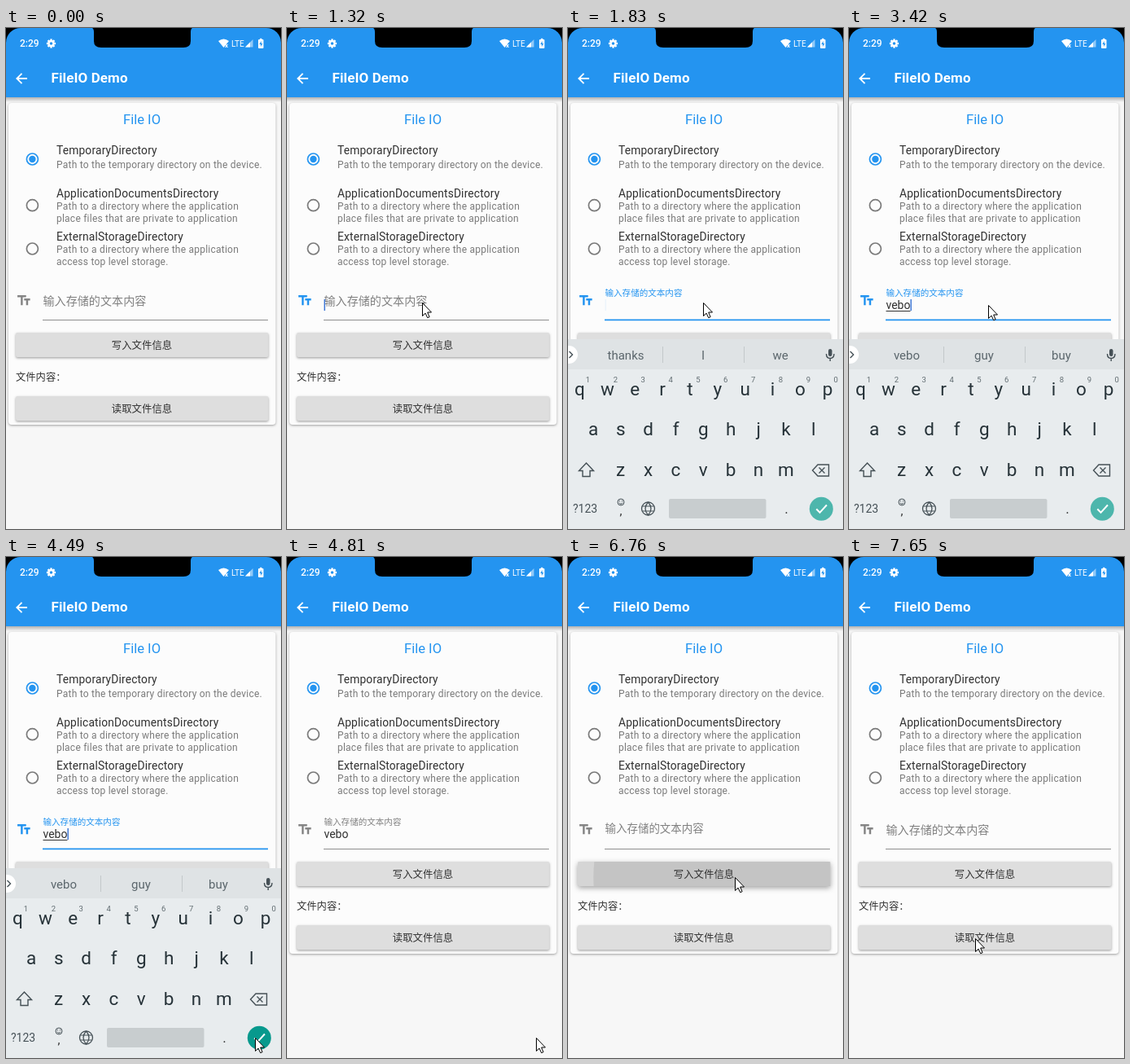
An HTML page with a canvas that plays this animation: 338 by 615 pixels, repeating every 8 s.

```html
<!DOCTYPE html>
<html lang="zh">
<head>
<meta charset="utf-8">
<style>
html, body { margin: 0; width: 100%; height: 100%; overflow: hidden; background: #f7f7f7; }
canvas { display: block; width: 338px; height: 615px; }
</style>
</head>
<body>
<canvas id="stage"></canvas>
<script>
const W = 338, H = 615, LOOP = 8000;
const BLUE = '#2494f0', GREY = '#7a7a7a', INK = '#303030';
const FONT = 'Roboto, "Noto Sans CJK SC", "Noto Sans CJK", sans-serif';
const WORD = 'vebo';

const canvas = document.getElementById('stage');
const c = canvas.getContext('2d');
const dpr = window.devicePixelRatio || 1;
canvas.width = W * dpr;
canvas.height = H * dpr;

const clamp = v => Math.max(0, Math.min(1, v));
const smooth = p => p * p * (3 - 2 * p);
const easeIn = p => p * p;
const easeOut = p => 1 - (1 - p) * (1 - p);
const phase = (t, from, to) => clamp((t - from) / (to - from));
const within = (t, from, to) => t >= from && t < to;

function text(str, x, y, size, color, { weight = 400, align = 'left', spacing = 0 } = {}) {
  c.font = `${weight} ${size}px ${FONT}`;
  c.letterSpacing = spacing + 'px';
  c.textAlign = align;
  c.fillStyle = color;
  c.fillText(str, x, y);
}
function rect(x, y, w, h, color, r = 0) {
  c.fillStyle = color;
  c.beginPath();
  c.roundRect(x, y, w, h, r);
  c.fill();
}
function raised(x, y, w, h, color, r, blur, dy) {
  c.save();
  c.shadowColor = 'rgba(0,0,0,.36)';
  c.shadowBlur = blur * dpr;
  c.shadowOffsetY = dy * dpr;
  rect(x, y, w, h, color, r);
  c.restore();
}
function disc(x, y, r, color) {
  c.fillStyle = color;
  c.beginPath();
  c.arc(x, y, r, 0, 7);
  c.fill();
}
function ring(x, y, r, color, width) {
  c.strokeStyle = color;
  c.lineWidth = width;
  c.beginPath();
  c.arc(x, y, r, 0, 7);
  c.stroke();
}
function line(d, color, width = 1.4) {
  c.strokeStyle = color;
  c.lineWidth = width;
  c.stroke(new Path2D(d));
}
function shape(d, color) {
  c.fillStyle = color;
  c.fill(new Path2D(d));
}

// Pointer moves: start, end, from, control, to, easing
const MOVES = [
  [110, 620, [273, 387], [195, 257], [166, 337], smooth],
  [3370, 4120, [166, 337], [338, 450], [306, 590], smooth],
  [5200, 6020, [306, 590], [298, 483], [237, 406], easeIn],
  [6020, 6250, [237, 406], [218, 395], [205, 393], easeOut],
  [7200, 7650, [205, 393], [180, 425], [155, 468], smooth]
];
const CLICKS = [[800, 990], [4300, 4490], [6430, 6580]];

function pointerAt(t) {
  const [from, to, a, b, d, ease] = MOVES.filter(m => t >= m[0]).pop();
  const s = ease(phase(t, from, to)), q = 1 - s;
  return [0, 1].map(i => q * q * a[i] + 2 * q * s * b[i] + s * s * d[i]);
}

function drawPointer(t) {
  if (t < 110) return;
  const [x, y] = pointerAt(t).map(Math.round);
  if (CLICKS.some(k => within(t, ...k))) ring(x, y, 14, '#333', 1);
  c.save();
  c.translate(x + .5, y + .5);
  const arrow = 'M0 0V16L3.6 12.6L6.2 18.2L8.6 17.2L6.2 11.5H11Z';
  shape(arrow, '#fff');
  line(arrow, '#000', 1);
  c.restore();
}

function drawHeader() {
  const shade = c.createLinearGradient(0, 85, 0, 91);
  shade.addColorStop(0, 'rgba(0,0,0,.28)');
  shade.addColorStop(1, 'rgba(0,0,0,0)');
  rect(0, 85, W, 6, shade);
  rect(0, 0, W, 40, '#000');
  rect(0, 0, W, 85, BLUE, [18, 18, 0, 0]);
  shape('M106 0Q108 1 108 5V16Q108 24 117 24H218Q227 24 227 16V5Q227 1 229 0Z', '#000');

  text('2:29', 17, 23, 12, '#fff', { weight: 500 });
  for (let i = 0; i < 8; i++) {
    c.save();
    c.translate(55.5, 19);
    c.rotate(i * Math.PI / 4);
    rect(-1.2, -5.6, 2.4, 3, '#fff');
    c.restore();
  }
  ring(55.5, 19, 3, '#fff', 2.4);
  shape('M261 16Q267.5 11 274 16L267.5 24Z', '#fff');
  text('x', 269, 24, 8, '#fff', { weight: 700 });
  text('LTE', 277, 22.5, 10, '#fff');
  shape('M294 23.5L303.5 14V23.5Z', 'rgba(255,255,255,.5)');
  shape('M294 23.5L300 17.5V23.5Z', '#fff');
  rect(310, 14, 6.5, 11, '#fff', 1);
  rect(312, 12.8, 2.5, 2, '#fff');
  shape('M313.8 16L311.3 20H313V23L315.4 19H313.8Z', BLUE);

  line('M26 62H13.5M19.5 55.8L13.3 62L19.5 68.2', '#fff', 1.8);
  text('FileIO Demo', 55.5, 67, 17, '#fff', { weight: 600, spacing: .1 });
}

function drawOption(y, title, lines, selected) {
  const color = selected ? BLUE : GREY;
  ring(32.4, y, 7, color, 1.7);
  if (selected) disc(32.4, y, 4.2, color);
  const top = lines.length > 1 ? y - 10 : y - 6.5;
  text(title, 62, top, 13.8, INK, { spacing: .16 });
  lines.forEach((s, i) =>
    text(s, 62, top + (lines.length > 1 ? 15 : 17.5) + i * 15, 12, GREY, { spacing: .23 }));
}

function drawButton(y, label, press = 0) {
  raised(12, y, 310.5, 30, '#dedede', 2, 3 + 3 * press, 1.2 + press);
  return () => text(label, 167, y + 19.5, 12.4, INK, { align: 'center' });
}

function drawField(t, typed) {
  const focused = within(t, 1320, 4710);
  const active = within(t, 1500, 4710);
  const color = focused ? BLUE : '#858585';
  c.save();
  c.translate(12, 324.7);
  c.scale(.82, .82);
  shape('M2.5 4v3h5v12h3V7h5V4zM21.5 9h-9v3h3v7h3v-7h3z', color);
  c.restore();

  const up = smooth(phase(t, 1480, 1720)) - smooth(phase(t, 6600, 6820));
  text('输入存储的文本内容', 45.5, 339.5 - 10.2 * up, 14.1 - 3.55 * up, active ? BLUE : '#808080');
  rect(45, active ? 357.6 : 358, 277, active ? 1.6 : 1, active ? BLUE : '#8f8f8f');

  text(typed, 45.5, 345, 14, INK);
  const width = c.measureText(typed).width;
  if (focused && typed) rect(45.5, 347, width, 1, INK);
  const caretOff = [[1750, 2160], [3130, 3420], [3750, 4080]].some(k => within(t, ...k));
  if (focused) rect(45.5 + width, 333, 1.5, 14, caretOff ? 'rgba(36,148,240,.07)' : '#4179d6');
}

function drawCard(t, typed) {
  raised(3, 92, 328.5, 395, '#fcfcfc', 4, 3, 1);
  text('File IO', 167, 118, 16.6, BLUE, { align: 'center' });
  drawOption(161, 'TemporaryDirectory', ['Path to the temporary directory on the device.'], true);
  drawOption(217.7, 'ApplicationDocumentsDirectory',
    ['Path to a directory where the application', 'place files that are private to application']);
  drawOption(271, 'ExternalStorageDirectory',
    ['Path to a directory where the application', 'access top level storage.']);
  drawField(t, typed);

  const fade = 1 - phase(t, 6800, 7040);
  const press = t < 6580 ? 0 : Math.min(phase(t, 6560, 6680), fade);
  const writeLabel = drawButton(374, '写入文件信息', press);
  if (press) {
    c.save();
    c.beginPath();
    c.rect(12, 374, 310.5, 30);
    c.clip();
    rect(12, 374, 310.5, 30, `rgba(0,0,0,${.04 * press})`);
    disc(205, 393, 10 + 190 * easeOut(phase(t, 6560, 6880)), `rgba(0,0,0,${.08 * fade})`);
    c.restore();
  }
  writeLabel();
  text('文件内容：', 12, 432.5, 12.3, INK);
  drawButton(452, '读取文件信息')();
}

function drawKeys(letters, x, y) {
  [...letters].forEach((k, i) => text(k, x + i * 33.85, y, 22.5, '#263238', { align: 'center' }));
}

function drawKeyboard(t, typed) {
  const shown = easeOut(phase(t, 1480, 1830)) - phase(t, 4680, 4800);
  if (shown <= 0) return;
  const mid = { align: 'center' }, dark = '#455056';
  c.save();
  c.translate(0, 233 * (1 - shown));
  rect(0, 382, W, 233, '#e8ecee');
  rect(0, 382, W, 37, '#dfe3e5');
  disc(1, 401, 11, '#fff');
  line('M1.5 397L5.5 401L1.5 405', dark);
  const words = typed ? [typed, 'guy', 'buy'] : ['thanks', 'I', 'we'];
  words.forEach((w, i) => text(w, 71 + 95 * i, 406.5, 15, '#5b666c', mid));
  rect(116, 391, 1, 20, '#c3c8ca');
  rect(216, 391, 1, 20, '#c3c8ca');
  rect(320, 394, 4.5, 9, dark, 2.2);
  line('M317.5 400Q317.5 405.5 322.2 405.5T327 400M322.2 405.5V409', dark);

  drawKeys('qwertyuiop', 14.5, 451);
  [...'1234567890'].forEach((d, i) => text(d, 24.5 + i * 33.85, 435, 9.5, '#626d72', mid));
  drawKeys('asdfghjkl', 31, 500);
  drawKeys('zxcvbnm', 64.7, 549.5);
  line('M22.5 534L13.5 543.5H18V550.5H27V543.5H31.5Z', dark);
  line('M307 536H320.5V550H307L300.5 543ZM308.5 539.5L315.5 546.5M315.5 539.5L308.5 546.5', dark);

  text('?123', 6, 594.6, 14, dark);
  ring(65, 582, 4, dark, 1);
  line('M62.8 583Q65 586 67.2 583M63.4 580V581.3M66.6 580V581.3', dark, 1);
  text(',', 65, 598, 15, INK, mid);
  ring(98.5, 590, 8, dark, 1.3);
  line('M98.5 582Q91.5 590 98.5 598Q105.5 590 98.5 582M91.3 587H105.7M91.3 593H105.7', dark, 1.2);
  rect(124, 578, 119.5, 24, '#c8cdcf', 2);
  text('.', 268.5, 596, 17, INK, mid);
  disc(311.3, 590.2, 14.5, t >= 4390 ? '#07998d' : '#4db6ac');
  line('M305.3 590.5L309.5 594.8L318 585.5', '#fff', 2);
  c.restore();
}

function draw(t) {
  const count = within(t, 2620, 6600) ? Math.min(4, 1 + Math.floor((t - 2620) / 90)) : 0;
  const typed = WORD.slice(0, count);
  c.setTransform(dpr, 0, 0, dpr, 0, 0);
  rect(0, 0, W, H, '#f7f7f7');
  drawCard(t, typed);
  drawHeader();
  drawKeyboard(t, typed);
  drawPointer(t);
}

const start = performance.now();
(function tick() {
  draw((performance.now() - start) % LOOP);
  requestAnimationFrame(tick);
})();
</script>
</body>
</html>
```
